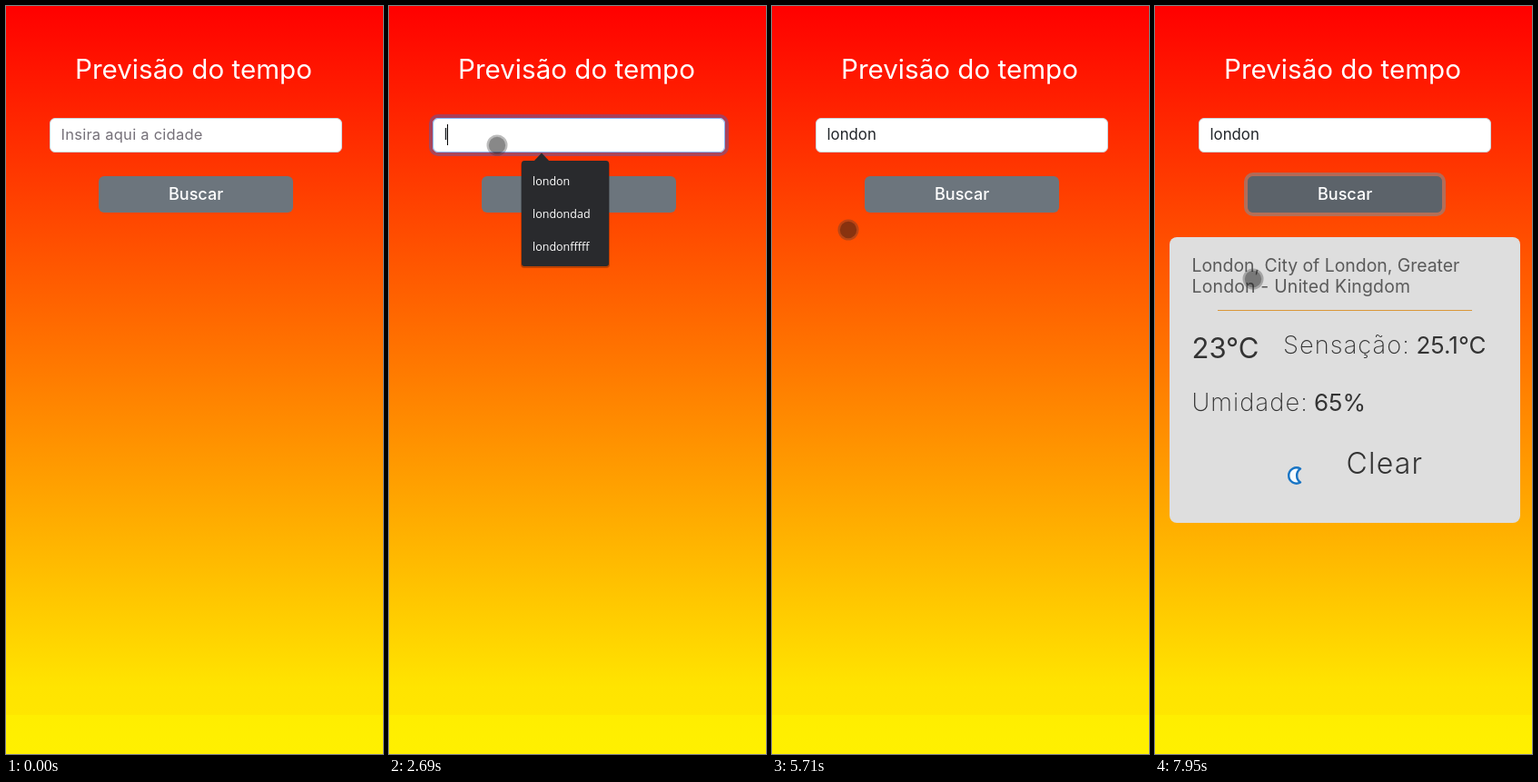
Animation of 415 by 822 pixels, one loop 8 s. Source, as an HTML page:

```html
<!DOCTYPE html>
<html lang="pt">
<head>
<meta charset="utf-8">
<title>Previsão do tempo</title>
<style>
  html, body { margin: 0; width: 100%; height: 100%; overflow: hidden; }
  svg { display: block; width: 100%; height: 100%; }
  text { font-family: Inter, sans-serif; white-space: pre; }
  .menu text { font: 12.5px "Open Sans", sans-serif; fill: #fff; font-variant-ligatures: none; }
  .plain .label { font-family: "Liberation Sans", Arial, sans-serif; font-weight: 400; letter-spacing: 0; }
  .label { font-size: 27.2px; font-weight: 200; letter-spacing: 1.1px; }
  #sky { font-size: 32px; font-weight: 300; letter-spacing: 1.2px; }
  .plain #sky { font-size: 32px; }
  .value { font-size: 26px; }
</style>
</head>
<body>
<svg viewBox="0 0 415 822" preserveAspectRatio="none">
  <defs>
    <linearGradient id="heat" x1="0" y1="0" x2="0" y2="1">
      <stop offset="0" stop-color="#f00"/>
      <stop offset=".91" stop-color="#ffe400"/>
      <stop offset=".948" stop-color="#ffe600"/>
      <stop offset=".948" stop-color="#ffee00"/>
      <stop offset="1" stop-color="#fff000"/>
    </linearGradient>
  </defs>
  <rect width="415" height="822" fill="url(#heat)"/>
  <text x="76" y="80" font-size="29.6" fill="#fff">Previsão do tempo</text>

  <rect id="glow" x="46" y="121" width="326" height="42" rx="8" fill="none" stroke="#0d6efd" stroke-opacity=".35" stroke-width="4"/>
  <rect x="48.5" y="123.5" width="321" height="37" rx="5.5" fill="#fff" stroke="#ced4da"/>
  <rect id="edge" x="48.5" y="123.5" width="321" height="37" rx="5.5" fill="none" stroke="#86b7fe"/>
  <text id="hint" x="60.5" y="147" font-size="16.5" letter-spacing=".25" fill="#757078">Insira aqui a cidade</text>
  <text id="typed" x="60.5" y="147" font-size="16.8" fill="#212529"></text>
  <rect id="caret" y="130" width="1" height="23" fill="#000"/>

  <rect id="ring" x="100" y="185" width="218" height="44" rx="8" fill="none" stroke="#828a91" stroke-opacity=".6" stroke-width="4"/>
  <rect x="102" y="187" width="214" height="40" rx="6" fill="#6c757d"/>
  <rect id="press" x="102" y="187" width="214" height="40" rx="6" fill="#5c636a"/>
  <text x="179" y="213" font-size="18" font-weight="500" fill="#fff">Buscar</text>

  <g id="card" fill="#333">
    <rect id="panel" x="16" y="254" width="386" height="297" rx="8" fill="#dedede"/>
    <g font-size="19.4" fill="#5a5a5a">
      <text x="40.5" y="292">London, City of London, Greater</text>
      <text x="40.5" y="315" letter-spacing=".2">London - United Kingdom</text>
    </g>
    <rect x="69" y="334" width="280" height="1" fill="#d9973a"/>
    <text x="40.5" y="387" font-size="31">23°C</text>
    <text class="label" x="141" y="382">Sensação:</text>
    <text class="value" id="feels" y="382">25.1°C</text>
    <text class="label" x="40.5" y="445">Umidade:</text>
    <text class="value" id="humid" y="445">65%</text>
    <text class="label" id="sky" y="514">Clear</text>
    <path id="moon" d="M160 508.5A8.6 8.6 0 1 0 160 523.5A9.2 9.2 0 0 1 160 508.5Z" fill="#f4fbff" stroke="#1874c4" stroke-width="2.4" stroke-linejoin="round"/>
  </g>

  <g id="menu" class="menu">
    <path d="M159 171L168 161.5L177 171Z" fill="#292a2d"/>
    <rect id="shade" x="145" y="171" rx="4" fill="#000" opacity=".25"/>
    <rect id="sheet" x="146" y="170" rx="3" fill="#292a2d"/>
    <g id="items"></g>
  </g>

  <g id="touch">
    <circle r="11.5" fill="#3c3c3c" fill-opacity=".35"/>
    <circle r="9.2" fill-opacity=".27"/>
  </g>
</svg>
<script>
const LOOP = 8000, TICK = 70;
const FOCUS = 2430, BLUR = 5520, PRESS = 6440, RESULT = 6790, FONTS = 6930, ICON = 7070;
const WORD = 'london';
const keys = [2690, 3030, 3970, 4300, 4400, 4500];
const cities = ['london', 'londondad', 'londonfffff', 'recife', 'porto alegre', 'lisboa'];
// time, x, y
const path = [
  [260, 354, 799], [380, 337, 753], [500, 300, 690], [670, 213, 460], [810, 178, 360],
  [880, 176, 308], [1010, 150, 217], [1080, 147, 207], [1220, 137, 183], [1430, 123, 161],
  [1700, 119, 153], [5110, 119, 153], [5180, 88, 211], [5250, 50, 280], [5320, 38, 300],
  [5450, 38, 300], [5700, 84, 246], [5900, 145, 222], [6100, 190, 212], [6300, 220, 206],
  [6790, 220, 206], [7000, 180, 221], [7150, 145, 224], [7350, 82, 250], [7530, 52, 277],
  [7600, 52, 277], [7940, 108, 300]
];

const $ = id => document.getElementById(id);
const set = (id, attrs) => { for (const k in attrs) $(id).setAttribute(k, attrs[k]); };
const show = (id, on) => { $(id).style.display = on ? '' : 'none'; };
const ease = x => { x = Math.min(1, Math.max(0, x)); return x * x * (3 - 2 * x); };
const fade = (t, start) => ease((t - start) / 190);

$('items').innerHTML = cities.map((c, i) => `<text x="158" y="${197 + 36 * i}">${c}</text>`).join('');

function touchAt(t) {
  const q = Math.max(path[0][0], Math.floor((t - 30) / TICK) * TICK + 30);
  const i = path.findIndex(p => p[0] > q);
  if (i < 0) return path[path.length - 1].slice(1);
  const [t0, x0, y0] = path[i - 1], [t1, x1, y1] = path[i];
  const k = (q - t0) / (t1 - t0);
  return [x0 + (x1 - x0) * k, y0 + (y1 - y0) * k];
}

function drawInput(t) {
  const count = keys.filter(k => t >= k).length;
  const typed = $('typed');
  typed.textContent = WORD.slice(0, count);
  show('hint', !count);

  const glow = fade(t, FOCUS + 60) * (1 - fade(t, BLUR));
  set('glow', { opacity: glow });
  set('edge', { opacity: glow });

  const last = count ? keys[count - 1] : FOCUS;
  show('caret', t >= FOCUS && t < BLUR && (t - last) % 1000 < 500);
  set('caret', { x: Math.round(60.3 + (count ? typed.getComputedTextLength() : 0)) });
}

function drawMenu(t) {
  show('menu', t >= 2560 && t < BLUR);
  const rows = t < keys[0] ? 6 : 3;
  const width = rows === 6 ? 124 : 96, height = rows * 36 + 8;
  set('sheet', { width, height });
  set('shade', { width: width + 2, height: height + 1 });
  [...$('items').children].forEach((item, i) => { item.style.display = i < rows ? '' : 'none'; });
}

function drawCard(t) {
  const loaded = t >= FONTS, icon = t >= ICON;
  show('card', t >= RESULT);
  $('card').setAttribute('class', loaded ? '' : 'plain');
  set('panel', { height: icon ? 314 : 297 });
  set('feels', { x: loaded ? 287.5 : 276.5 });
  set('humid', { x: loaded ? 175 : 164.5 });
  set('sky', { x: icon ? 210.5 : loaded ? 179 : 183 });
  show('moon', icon);
}

function render(t) {
  drawInput(t);
  drawMenu(t);
  set('ring', { opacity: fade(t, PRESS) });
  set('press', { opacity: fade(t, PRESS) });
  drawCard(t);
  show('touch', t >= path[0][0]);
  set('touch', { transform: `translate(${touchAt(t)})` });
}

const start = performance.now();
function loop() {
  render((performance.now() - start) % LOOP);
  requestAnimationFrame(loop);
}
loop();
</script>
</body>
</html>
```
